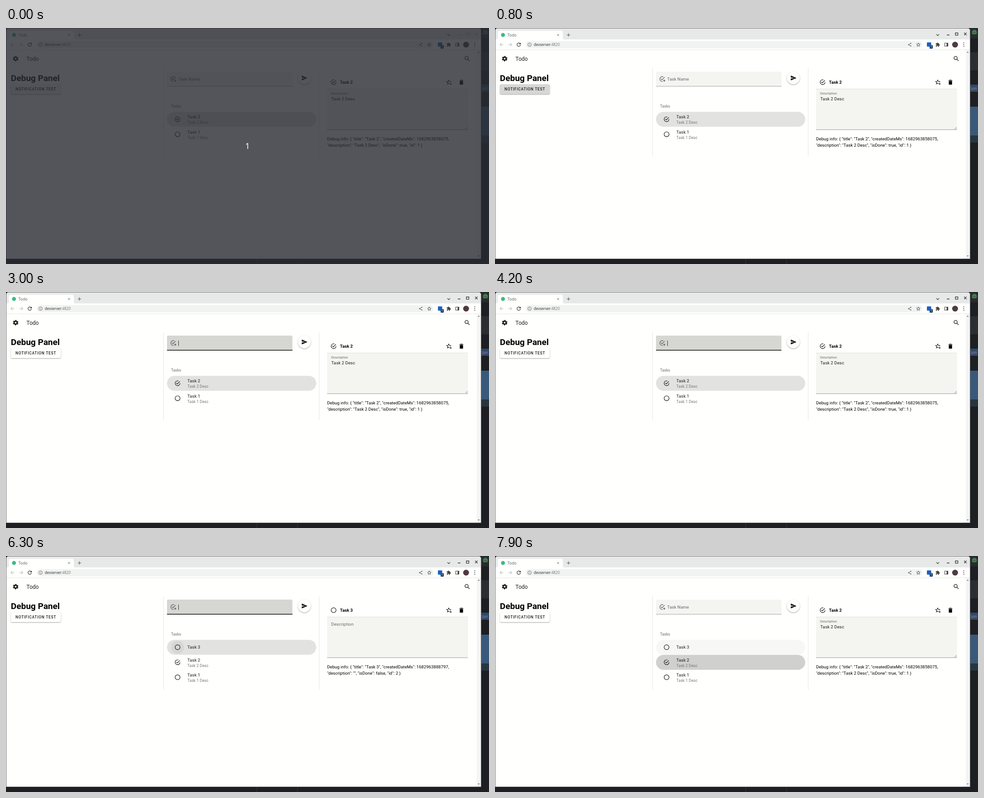
An HTML page that plays this animation: 1068 px wide and 525 px high, repeating every 8000 ms.

```html
<!DOCTYPE html>
<html lang="en">
<head>
<meta charset="utf-8">
<title>Todo</title>
<style>
html, body { margin: 0; width: 100%; height: 100%; overflow: hidden; background: #1e1f22; }
svg { display: block; width: 100%; height: 100%; }
text { font-family: Roboto, sans-serif; white-space: pre; }
.ui { font-family: "Noto Sans", sans-serif; }
.mono { font-family: "Noto Sans Mono", monospace; font-style: italic; }
.lift { filter: drop-shadow(0 1px 1px rgba(0, 0, 0, .38)); }
</style>
</head>
<body>
<script>
const LOOP = 8000, STEP = 100;
const HOST = 'devserver', PORT = ':4820';
const INK = '#1b1b1b', MUTED = '#757575', FIELD = '#f4f4f1', PAGE = '#fffffd';

// Icons live on a 24 unit grid; "line" icons are stroked, the others filled.
const ICONS = {
  done: { d: 'M20 12A8 8 0 1 1 12 4C12.76 4 13.5 4.11 14.2 4.31L15.77 2.74A10 10 0 1 0 22 12M7.91 10.08L6.5 11.5 11 16 21 6 19.59 4.58 11 13.17Z' },
  open: { line: 2, d: 'M12 3A9 9 0 1 1 12 21A9 9 0 1 1 12 3Z' },
  addTask: { line: 2, d: 'M15.5 3.8A9 9 0 1 0 13 21M7.2 10.8L11 14.6 20.5 5.2M19 14V22M15 18H23' },
  star: { line: 1.9, d: 'M14.5 16.8L12 15.4 7.2 18.4 8.5 12.9 4.2 9.2 9.8 8.7 12 3.5 14.2 8.7 19.8 9.2 16.8 12M19 14V22M15 18H23' },
  trash: { d: 'M19 4H15.5L14.5 3H9.5L8.5 4H5V6H19M6 19A2 2 0 0 0 8 21H16A2 2 0 0 0 18 19V7H6Z' },
  send: { d: 'M2 21L23 12 2 3V10L17 12 2 14Z' },
  search: { line: 2.2, d: 'M15.5 9.5A6 6 0 1 1 3.5 9.5A6 6 0 1 1 15.5 9.5M14 14L20.5 20.5' },
  clear: { d: 'M12 2A10 10 0 1 0 12 22A10 10 0 1 0 12 2M17 15.6L15.6 17 12 13.4 8.4 17 7 15.6 10.6 12 7 8.4 8.4 7 12 10.6 15.6 7 17 8.4 13.4 12Z' },
  cross: { line: 2.6, d: 'M5 5L19 19M19 5L5 19' },
  plus: { line: 2.2, d: 'M12 3V21M3 12H21' },
  back: { line: 2.2, d: 'M21 12H4M12 4L4 12 12 20' },
  forward: { line: 2.2, d: 'M3 12H20M12 4L20 12 12 20' },
  reload: { line: 2.6, d: 'M19 7A8.5 8.5 0 1 0 20.5 13M20.5 3V9H14' },
  info: { line: 2, d: 'M12 2.5A9.5 9.5 0 1 1 12 21.5A9.5 9.5 0 1 1 12 2.5M12 11V17M12 7V9' },
  share: { line: 2.2, d: 'M18 5L6 12 18 19M16 5H20M16 19H20M4 12H8M18 3V7M18 17V21M6 10V14' },
  bookmark: { line: 2.2, d: 'M12 3L14.6 9 21 9.6 16.2 14 17.6 20.5 12 17.1 6.4 20.5 7.8 14 3 9.6 9.4 9Z' },
  puzzle: { d: 'M20.5 11H19V7A2 2 0 0 0 17 5H13V3.5A2.5 2.5 0 0 0 8 3.5V5H4A2 2 0 0 0 2 7V10.8H3.5A2.7 2.7 0 0 1 3.5 16.2H2V20A2 2 0 0 0 4 22H7.8V20.5A2.7 2.7 0 0 1 13.2 20.5V22H17A2 2 0 0 0 19 20V16H20.5A2.5 2.5 0 0 0 20.5 11Z' },
  bug: { line: 2.2, d: 'M7 10A5 5 0 0 1 17 10V15A5 5 0 0 1 7 15ZM7 10H17M12 10V20M8 3L10 6M16 3L14 6M2 8L7 11M22 8L17 11M1 14H7M17 14H23M3 21L7 17M21 21L17 17' }
};

const attrs = (o = {}) => Object.entries(o).map(([k, v]) => ` ${k}="${v}"`).join('');
const rect = (x, y, width, height, fill, more) =>
  `<rect${attrs({ x, y, width, height, fill, ...more })}/>`;
const circle = (cx, cy, r, fill, more) => `<circle${attrs({ cx, cy, r, fill, ...more })}/>`;
const path = (d, stroke, more) => `<path${attrs({ d, stroke, fill: 'none', ...more })}/>`;
const label = (x, y, str, size, fill = INK, more) =>
  `<text${attrs({ x, y, 'font-size': size, fill, ...more })}>${str}</text>`;
const group = (id, body, more) => `<g${attrs({ id, ...more })}>${body}</g>`;

function icon(name, x, y, size = 14.4, color = INK, more) {
  const { d, line } = ICONS[name];
  const paint = line ? { fill: 'none', stroke: color, 'stroke-width': line } : { fill: color };
  const transform = `translate(${x} ${y}) scale(${size / 24}) translate(-12 -12)`;
  return `<path${attrs({ d, transform, ...paint, ...more })}/>`;
}

const ui = { class: 'ui' };

const backdrop = () =>
  rect(0, 0, 1068, 525, '#1e1f22') +
  rect(1050, 0, 18, 23, '#282a2d') +
  rect(1050, 54, 18, 40, '#2b2d30') +
  rect(1050, 126, 18, 16, '#2f4a66') +
  rect(1050, 175, 18, 64, '#39597a') +
  rect(1050, 239, 18, 16, '#27353f') +
  label(1064.5, 138, 'ron', 10, '#a07fb8', { class: 'mono', 'text-anchor': 'end' }) +
  icon('bug', 1060, 9, 13, '#4fa65a') +
  path('M554.5 513V525M644.5 513V525', '#303236');

const browser = () =>
  path('M.5 513.5V6Q.5 .5 6 .5H1045Q1050.5 .5 1050.5 6V513.5Z', '#6e6f70', { fill: '#e7e9e9' }) +
  rect(0, 203, 1, 3, '#4a80b0') +
  path('M2 26Q6 26 6 21V10Q6 6 10 6H146Q150 6 150 10V21Q150 26 154 26Z', 'none', { fill: PAGE }) +
  rect(1, 25.5, 1049, 487.5, PAGE) +
  circle(17.7, 15.5, 4.4, '#41b883') +
  label(27.5, 18.7, 'Todo', 8.6, '#5f6368', ui) +
  icon('cross', 139.5, 15.5, 7.5, '#444') +
  icon('plus', 162.5, 15.5, 10, '#444') +
  path('M976 14L979 17 982 14', '#444', { 'stroke-width': 1.3 }) +
  group('controls', path('M999 15.5H1005M1018 11H1023.5V16.2H1018ZM1037.3 10.5L1042.7 16M1042.7 10.5L1037.3 16', 'currentColor', { 'stroke-width': 1.3 })) +
  rect(68, 29, 877, 16, '#f1f3f2', { rx: 8 }) +
  icon('back', 14.5, 37, 11, '#b4b6b9') +
  icon('forward', 33.5, 37, 11, '#b4b6b9') +
  icon('reload', 52.5, 37, 11, '#333') +
  icon('info', 76.5, 37, 10, '#555') +
  label(85.7, 40, `${HOST}<tspan fill="#777">${PORT}</tspan>`, 8, '#303236', ui) +
  icon('share', 917, 37, 10.5, '#444') +
  icon('bookmark', 936, 37, 10.5, '#444') +
  rect(955, 32, 9.5, 9.5, '#1a62c6', { rx: 1 }) +
  rect(961, 38, 7, 8, '#24405f', { rx: 1.5 }) +
  label(964.5, 44.4, '1', 6.5, '#fff', { ...ui, 'text-anchor': 'middle' }) +
  icon('puzzle', 979, 37, 10.5, '#444') +
  path('M994.5 33.5H1001.5V40.5H994.5Z', '#444', { 'stroke-width': 1.2 }) +
  rect(998.5, 33.5, 3, 7, '#444') +
  circle(1017.3, 37, 6.5, '#4e3a42') +
  [33, 37, 41].map(y => circle(1036.5, y, 1, '#444')).join('') +
  rect(1, 48, 1049, 1, '#e6e6e6') +
  rect(1041, 49, 9, 464, '#f4f4f4') +
  path('M1043 55L1045.3 52.3 1047.6 55ZM1043 506L1045.3 508.7 1047.6 506Z', 'none', { fill: '#777' });

const cog = () =>
  circle(21.3, 68.2, 3.3, 'none', { stroke: INK, 'stroke-width': 2.8 }) +
  circle(21.3, 68.2, 5.1, 'none', { stroke: INK, 'stroke-width': 1.9, 'stroke-dasharray': '2.8 2.54', 'stroke-dashoffset': -1.27 });

const leftPanel = () =>
  cog() + label(45.3, 72.5, 'Todo', 12) + icon('search', 1020, 68.2, 14.4) +
  label(10.8, 118, 'Debug Panel', 19.05, '#000', { 'font-weight': 700 }) +
  rect(11, 125.3, 110, 21.8, PAGE, { rx: 2.4, class: 'lift' }) +
  rect(11, 125.3, 110, 21.8, '#000', { rx: 2.4, id: 'buttonShade' }) +
  circle(66, 136, 0, '#000', { id: 'buttonRipple', 'clip-path': 'url(#buttonClip)' }) +
  label(21, 139.2, 'NOTIFICATION TEST', 8.4, INK, { 'font-weight': 500, 'letter-spacing': .75 });

const FIELD_SHAPE = 'M356 130V99.4Q356 97 358.4 97H631Q633.4 97 633.4 99.4V130Z';
const inputBox = () =>
  path(FIELD_SHAPE, 'none', { fill: FIELD }) +
  path(FIELD_SHAPE, 'none', { fill: '#000', id: 'inputShade' }) +
  rect(356, 129.3, 277.4, .8, '#8f8f8f') +
  rect(356, 128.8, 277.4, 1.4, '#000', { id: 'inputLine' }) +
  icon('addTask', 370, 113.5, 14.4, '#555') +
  label(380.7, 116.6, 'Task Name', 9.6, '#676767', { id: 'placeholder' }) +
  label(380.7, 117.2, '', 9.6, INK, { id: 'typed', 'letter-spacing': .09 }) +
  rect(381, 108, 1, 12, '#333', { id: 'caret' }) +
  icon('clear', 618, 113.5, 14.4, '#555', { id: 'clear', 'fill-rule': 'evenodd' }) +
  circle(659.7, 111.2, 14.2, PAGE, { class: 'lift' }) +
  icon('send', 660, 111.2, 14.4, '#000');

const toggle = (id, x, y) =>
  group(id + 'Open', icon('open', x, y)) + group(id + 'Done', icon('done', x, y));

// Each row is drawn at the top slot and moved down by a translate.
function row(id, title, note, mark) {
  return group(id,
    rect(356, 186.5, 330, 33.3, '#000', { rx: 16.6, id: id + 'Shade', opacity: 0 }) +
    mark +
    label(401, note ? 201.2 : 206.2, title, 9.6, INK, { 'letter-spacing': .09 }) +
    label(401, 213.2, note, 8.4, MUTED, { 'letter-spacing': .15 }));
}

const taskList = () =>
  rect(348, 90, 1, 195, '#e4e4e4', { id: 'ruleA' }) +
  rect(692, 90, 1, 195, '#e4e4e4', { id: 'ruleB' }) +
  label(365, 177.4, 'Tasks', 8.4, '#6b6b6b') +
  row('task3', 'Task 3', '', circle(379.4, 203, 14.3, '#000', { id: 'halo' }) + toggle('row', 379.4, 203)) +
  row('task2', 'Task 2', 'Task 2 Desc', icon('done', 379.4, 203)) +
  row('task1', 'Task 1', 'Task 1 Desc', icon('open', 379.4, 203));

const detail = () =>
  toggle('head', 724.4, 120.5) +
  label(738.5, 123.8, '', 9.6, '#000', { id: 'detailTitle', 'font-weight': 700 }) +
  icon('star', 979, 120.7) + icon('trash', 1007, 120.7, 14.4, '#000') +
  rect(710, 135, 311.5, 91.5, FIELD) +
  rect(710, 135, 311.5, .7, '#dcdcdc') +
  rect(710, 225.7, 311.5, .9, '#8f8f8f') +
  label(719, 155.3, 'Description', 9.6, '#676767', { id: 'emptyLabel', 'letter-spacing': .09 }) +
  group('filled',
    label(719, 147.6, 'Description', 7.2, '#676767', { 'letter-spacing': .07 }) +
    label(719.3, 161.3, 'Task 2 Desc', 9.6, INK, { 'letter-spacing': .09 }) +
    path('M1016 225L1021 220M1019 225L1021 223', '#777', { 'stroke-width': .8 })) +
  label(710, 249.6, '', 9.6, '#000', { id: 'debugA' }) +
  label(710, 264, '', 9.6, '#000', { id: 'debugB' });

const notification = () => group('notice',
  path('M334.5 -70H633.5V60Q633.5 64.5 629 64.5H339Q334.5 64.5 334.5 60Z', '#b9b9b9', { fill: '#1e1c1b' }) +
  circle(355.3, -4.5, 9, '#4f9a57') +
  label(373.8, 7.2, HOST + PORT, 8.3, '#e4e4e4', ui) +
  label(373.8, 27.4, 'HEY! Your task is now overdue.', 8.3, '#f0f0f0', ui) +
  path('M336 40H632.4V60Q632.4 63 629.4 63H339Q336 63 336 60Z', '#dc6d43', { fill: '#32302f', 'stroke-width': 1.6 }) +
  label(483.5, 54.8, 'Settings', 8.6, '#f2f2f2', { ...ui, 'text-anchor': 'middle' }));

const countdown = () => group('countdown',
  rect(0, 0, 1068, 525, '#282b33', { opacity: .8 }) +
  label(534, 269.3, '1', 18.5, '#fff', { ...ui, 'text-anchor': 'middle' }));

document.body.innerHTML =
  `<svg viewBox="0 0 1068 525"><defs><clipPath id="buttonClip">${rect(11, 125.3, 110, 21.8, '#000', { rx: 2.4 })}</clipPath></defs>` +
  backdrop() + browser() + leftPanel() + inputBox() + taskList() + detail() + notification() + countdown() + '</svg>';

const el = Object.fromEntries([...document.querySelectorAll('[id]')].map(e => [e.id, e]));
const set = (id, values) => { for (const k in values) el[id].setAttribute(k, values[k]); };
const show = (id, on) => set(id, { opacity: +on });
const write = (id, str) => { if (el[id].textContent !== str) el[id].textContent = str; };

// Piecewise linear value from [time, value] pairs; equal times make a hard change.
function track(t, ...keys) {
  const next = keys.findIndex(([time]) => t < time);
  if (next === 0) return keys[0][1];
  if (next < 0) return keys[keys.length - 1][1];
  const [[t0, v0], [t1, v1]] = keys.slice(next - 1, next + 1);
  return v0 + (v1 - v0) * (t - t0) / (t1 - t0);
}
const within = (t, ...spans) => spans.some(([a, b]) => t >= a && t < b);

function render(t) {
  const added = t >= 5000;
  const onThree = within(t, [5000, 7700]);
  const threeDone = within(t, [6500, 7200]);

  show('countdown', t < 100);
  el.controls.style.color = within(t, [700, 1000], [1800, LOOP]) ? '#333' : '#b5b7b8';

  show('buttonShade', track(t, [0, .04], [1000, .04], [1200, 0]));
  set('buttonRipple', {
    r: track(t, [500, 0], [800, 60]),
    opacity: track(t, [500, .12], [800, .12], [1100, 0])
  });
  set('notice', {
    transform: `translate(0 ${track(t, [900, -68], [1000, -36], [1100, -14], [1200, -3], [1300, 0], [1600, 0], [1700, -12], [1800, -42], [1900, -68])})`
  });

  const focus = track(t, [2600, 0], [2900, 1], [6400, 1], [6700, 0]);
  show('inputShade', focus * .125);
  set('inputLine', { x: 356 + 138.7 * (1 - focus), width: 277.4 * focus });
  show('placeholder', 1 - focus);
  const count = added ? 0 : Math.max(0, Math.floor((t - 4200) / 100));
  write('typed', 'Task 3'.slice(0, count));
  set('caret', {
    x: 381 + (count ? el.typed.getComputedTextLength() : 0),
    opacity: +within(t, [2800, 3500], [4000, 5400], [5900, 6400])
  });
  show('clear', track(t, [4300, 0], [4600, 1], [5000, 1], [5200, 0]));

  const shift = added ? 33.4 : 0;
  show('task3', added);
  set('task2', { transform: `translate(0 ${shift})` });
  set('task1', { transform: `translate(0 ${33.4 + shift})` });
  for (const rule of ['ruleA', 'ruleB']) set(rule, { height: added ? 208 : 195 });
  show('task3Shade', track(t, [0, .115], [7600, .115], [7900, .03]));
  show('task2Shade', track(t, [0, .115], [5000, .115], [5000, .137], [5200, 0], [7600, 0], [7900, .185]));
  show('halo', track(t, [6200, 0], [6300, .05], [6500, .12], [6800, .05], [7200, .12], [7500, 0]));

  show('rowOpen', !threeDone);
  show('rowDone', threeDone);
  const checked = !onThree || threeDone;
  show('headOpen', !checked);
  show('headDone', checked);
  show('emptyLabel', onThree);
  show('filled', !onThree);
  const [title, stamp, note, id] = onThree
    ? ['Task 3', 1682963888797, '', 2]
    : ['Task 2', 1682963858075, 'Task 2 Desc', 1];
  write('detailTitle', title);
  write('debugA', `Debug info: { "title": "${title}", "createdDateMs": ${stamp},`);
  write('debugB', `"description": "${note}", "isDone": ${checked}, "id": ${id} }`);
}

const start = performance.now();
function tick() {
  const t = (performance.now() - start) % LOOP;
  render(Math.floor(t / STEP) * STEP);
  requestAnimationFrame(tick);
}
tick();
</script>
</body>
</html>
```
